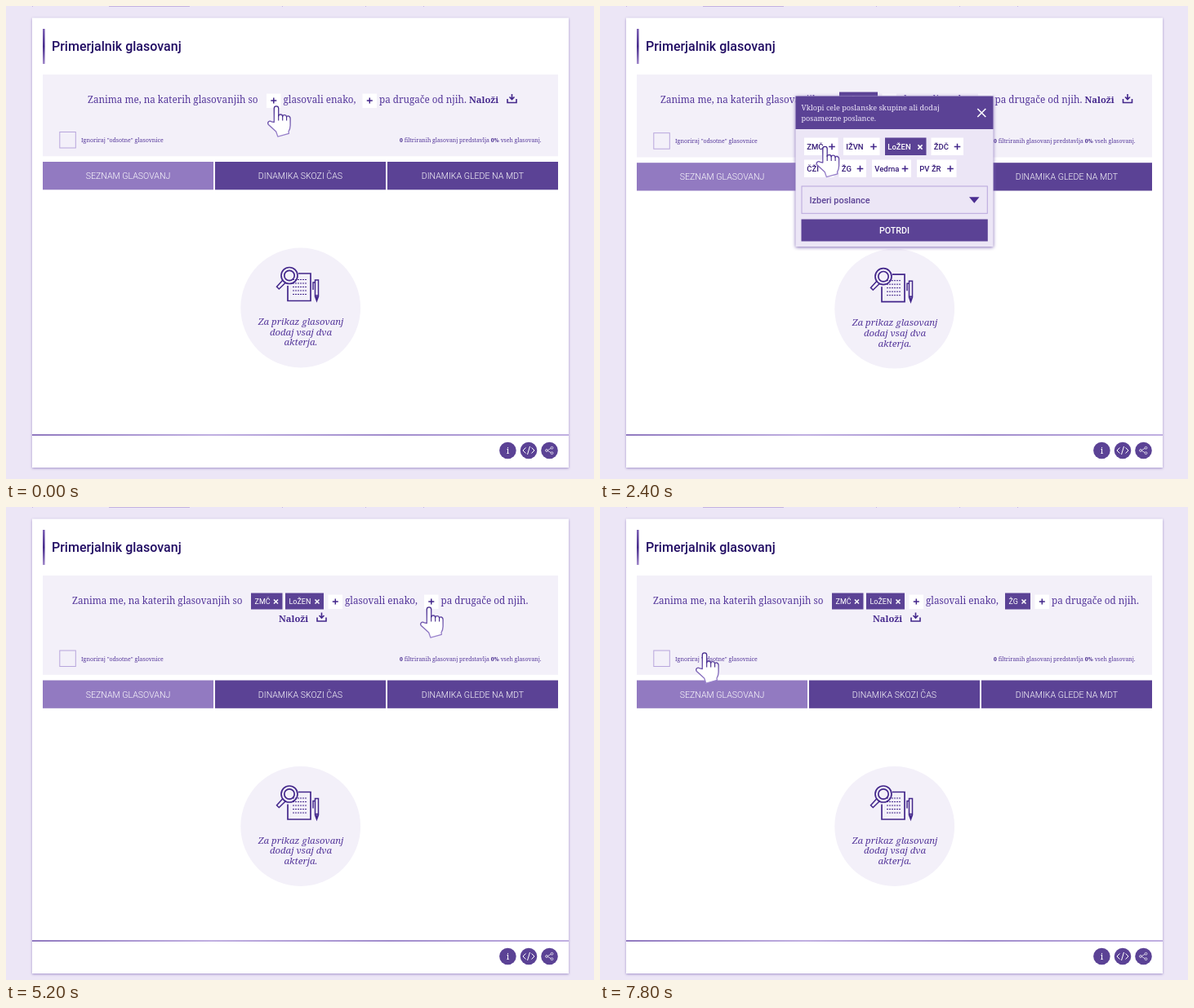
An HTML page for the animation above (8 s loop, 720 by 580 pixels).

```html
<!DOCTYPE html>
<html lang="sl">
<head>
<meta charset="utf-8">
<style>
  html, body { margin: 0; width: 100%; height: 100%; overflow: hidden; background: #ece6f6; }
  svg { display: block; width: 720px; height: 580px; }
  text { font-family: Roboto, sans-serif; white-space: pre; }
  .serif { font-family: "Noto Serif", serif; fill: #55379b; }
  .bold { font-weight: 700; fill: #44278c; }
  .mid { text-anchor: middle; }
  .line { fill: none; stroke: #43278b; }
  .white { fill: none; stroke: #fff; }
  .card { filter: drop-shadow(0 1px 1.5px #a08fc9); }
  .popup { filter: drop-shadow(0 1px 2px #8069b4); }
</style>
</head>
<body>
<svg id="stage" viewBox="0 0 720 580"></svg>
<script>
const LOOP = 8000, STEP = 200;
const PURPLE = '#5b4295', PALE = '#f3f0f9', LILAC = '#ece6f6';
const stage = document.getElementById('stage');

const rect = (x, y, w, h, fill, extra = '') =>
  `<rect x="${x}" y="${y}" width="${w}" height="${h}" fill="${fill}" ${extra}/>`;
const text = (x, y, size, content, extra = '') =>
  `<text x="${x}" y="${y}" font-size="${size}" ${extra}>${content}</text>`;
const path = (d, extra) => `<path d="${d}" ${extra}/>`;
const group = (x, y, content, extra = '') => `<g transform="translate(${x} ${y})" ${extra}>${content}</g>`;
const plus = (x, y, r) => path(`M${x - r} ${y}h${2 * r}M${x} ${y - r}v${2 * r}`, 'class="line" stroke-width="1.5"');
const cross = (x, y, r, width = 1.5) =>
  path(`M${x - r} ${y - r}l${2 * r} ${2 * r}m0 ${-2 * r}l${-2 * r} ${2 * r}`, `class="white" stroke-width="${width}"`);

const parties = [
  ['ZMČ', 250, 162, 41.5], ['IŽVN', 298, 162, 44.5], ['LoŽEN', 349, 162, 50.5], ['ŽDČ', 405.5, 162, 39.5],
  ['ČŽI', 250, 189, 36.5], ['ŽG', 292.5, 189, 33.5], ['Vedrna', 333, 189, 48], ['PV ŽR', 388, 189, 48.5]
];
const chipWidth = { 'ZMČ': 38.5, 'LoŽEN': 47, 'ŽG': 31 };

// Selections and the vertical shifts they cause in the layout.
const layouts = [
  { from: 0, x: 100, same: [], other: [], dy: 0, foot: 0 },
  { from: 1600, x: 74, same: ['LoŽEN'], other: [], dy: 1.2, foot: 0 },
  { from: 2600, x: 81, same: ['ZMČ', 'LoŽEN'], other: [], dy: 21.5, foot: 6, wrap: true },
  { from: 6600, x: 65, same: ['ZMČ', 'LoŽEN'], other: ['ŽG'], dy: 21.5, foot: 6, wrap: true }
];

// Pointer keys: time, x, y, opacity.
const pointerKeys = [
  [0, 320, 121.5, 1], [400, 320, 121.5, 1], [1400, 346.5, 172, 1], [1600, 346.5, 172, 1],
  [2400, 264.5, 171, 1], [2600, 264.5, 171, 1], [3200, 264.5, 171, 0], [3201, 346, 271, 0],
  [3400, 346, 271, 0], [4000, 346, 271, 1], [4400, 346, 271, 1], [5200, 507, 121.5, 1],
  [5400, 507, 121.5, 1], [6400, 293, 203.5, 1], [6600, 293, 203.5, 1], [7000, 346, 271, 1],
  [7200, 346, 271, 1], [7800, 117, 177.5, 1], [LOOP, 117, 177.5, 1]
];

function pointerAt(t) {
  const i = pointerKeys.findIndex(key => key[0] > t);
  const a = pointerKeys[i - 1], b = pointerKeys[i];
  const p = (t - a[0]) / (b[0] - a[0]), eased = p * p * (3 - 2 * p);
  return [1, 2, 3].map(k => a[k] + (b[k] - a[k]) * (k < 3 ? eased : p));
}

function picker(x, names) {
  let out = '';
  for (const name of names) {
    const w = chipWidth[name];
    out += rect(x, 105.5, w, 20, PURPLE) + text(x + 4.5, 119, 9, name, 'fill="#fff"') + cross(x + w - 8, 116, 2.5);
    x += w + 3.5;
  }
  if (names.length) x += 2;
  return [out + rect(x, 107.5, 17.5, 17.5, '#fff') + plus(x + 8.8, 116, 3.5), x + 20.5];
}

function sentence({ x, same, other, wrap }) {
  const phrase = (px, words) => text(px, 119, 11.7, words, 'class="serif"');
  const [first, enakoX] = picker(x + 219, same);
  const [second, paX] = picker(enakoX + 97, other);
  const loadX = wrap ? 334 : paX + 110, loadY = wrap ? 21.5 : 0;
  const load = text(0, 119, 11.2, 'Naloži', 'class="serif bold"') +
    path('M47 114v4.5h11v-4.5M52.5 108v6.5m-3-3l3 3l3-3', 'class="line" stroke-width="1.6"');
  return phrase(x, 'Zanima me, na katerih glasovanjih so') + first + phrase(enakoX, 'glasovali enako,') +
    second + phrase(paX, 'pa drugače od njih.') + group(loadX, loadY, load);
}

function emptyState() {
  const dashes = [335.5, 340, 344.5, 349, 353.5].map(y => `M351 ${y}h17`).join('');
  return '<circle cx="360.7" cy="370" r="73.4" fill="' + PALE + '"/>' +
    path('M345 343v18.5h28v-33.5h-15', 'class="line" stroke-width="1.7"') +
    path(dashes, 'class="line" stroke-width="1" stroke-dasharray="2 1"') +
    `<g class="line" stroke-width="1.7"><circle cx="347" cy="330.5" r="10"/><circle cx="347" cy="330.5" r="6.2"/></g>` +
    path('M339 336l-7.5 8.2l2.8 2.8l8-7.7', 'class="line" stroke-width="1.5"') +
    path('M378.5 336h4v20l-2 5.5l-2-5.5zM378.5 339h-2.5v9M378.5 355h4', 'class="line" stroke-width="1.5"') +
    path('M379 356h3l-1.5 5z', 'fill="#43278b"') +
    ['Za prikaz glasovanj', 'dodaj vsaj dva', 'akterja.'].map((words, i) =>
      text(361, 391 + 12.7 * i, 11.4, words, 'class="serif mid" font-style="italic"')).join('');
}

function footer() {
  const dots = [614.4, 640, 665.5].map(x => `<circle cx="${x}" cy="545" r="10.3" fill="${PURPLE}"/>`).join('');
  return rect(32, 525.2, 657, 1.6, 'url(#rule)') + dots +
    text(614.4, 549, 11, 'i', 'class="mid" style="font-family:\'Noto Serif\',serif" fill="#fff"') +
    path('M636.5 541.5l-3.5 3.5l3.5 3.5m7-7l3.5 3.5l-3.5 3.5m-2-8.5l-3 10', 'class="white" stroke-width="1"') +
    path('M668 542l-5.5 3l5.5 3', 'class="white" stroke-width=".7"') +
    [[662, 545], [668.5, 541.8], [668.5, 548.2]].map(([x, y]) =>
      `<circle cx="${x}" cy="${y}" r="1.4" fill="${PURPLE}" stroke="#fff" stroke-width=".7"/>`).join('');
}

function page(layout) {
  const { dy, foot } = layout;
  const tabs = ['SEZNAM GLASOVANJ', 'DINAMIKA SKOZI ČAS', 'DINAMIKA GLEDE NA MDT'].map((label, i) =>
    rect(45 + 211 * i, 191, 209, 34.3, i ? PURPLE : '#927ac1') +
    text(149.5 + 211 * i, 212, 10.6, label, 'class="mid" fill="#fff" font-weight="300"')).join('');
  const options = rect(65.8, 154.5, 19.5, 19.5, 'none', 'stroke="#b8a6dc"') +
    text(92, 167, 7.05, 'Ignoriraj "odsotne" glasovnice', 'class="serif"') +
    text(655.5, 167, 6.9, '<tspan class="bold">0</tspan> filtriranih glasovanj predstavlja ' +
      '<tspan class="bold">0%</tspan> vseh glasovanj.', 'class="serif" text-anchor="end"');
  return rect(0, 0, 720, 580, LILAC) +
    path('M126 .3h99', 'stroke="#b9a5dd"') + path('M32 .3h1m305 0h1m101 0h1m70 0h1', 'stroke="#b9a5dd"') +
    rect(32, 14.5, 657, 551.5 + foot, '#fff', 'class="card"') +
    rect(45, 28, 2.6, 43, 'url(#accent)') +
    text(56, 55, 16, 'Primerjalnik glasovanj', 'font-weight="500" fill="#210c63"') +
    rect(45, 84, 631, 100.3 + dy, PALE) + sentence(layout) +
    group(0, dy, options + tabs + emptyState()) + group(0, foot, footer());
}

function popup(selected) {
  const buttons = parties.map(([name, x, y, w]) => {
    const on = selected.includes(name), markX = x + w - 7.5;
    return rect(x, y - .5, w, 21.5, on ? PURPLE : '#fff') +
      text(x + 3.3, y + 14, 9.5, name, `font-weight="500" fill="${on ? '#fff' : '#351a78'}"`) +
      (on ? cross(markX, y + 11, 2.6) : plus(markX, y + 10.5, 3.8));
  }).join('');
  const intro = ['Vklopi cele poslanske skupine ali dodaj', 'posamezne poslance.'].map((words, i) =>
    text(246.5, 128 + 13 * i, 9.1, words, 'class="serif" style="fill:#eee7fa"')).join('');
  return `<g class="popup">${rect(239.5, 110.5, 242, 184.5, LILAC)}</g>` +
    rect(239.5, 110.5, 242, 40.5, PURPLE) + intro + cross(467.3, 131, 5, 1.6) + buttons +
    rect(247, 221, 227.3, 33.3, 'none', 'stroke="#b8a6dc"') +
    text(256.5, 241.5, 10.9, 'Izberi poslance', `fill="${PURPLE}" font-weight="500"`) +
    path('M452 234.3h12.5l-6.2 7.5z', 'fill="#4b2e91"') +
    rect(246.5, 261.5, 228.3, 27, PURPLE) +
    text(360.5, 278.5, 10.7, 'POTRDI', 'class="mid" fill="#fff" font-weight="500"');
}

const hand = path('M8.3 21V4a2.7 2.7 0 0 1 5.4 0V13.5q.3-2 2.5-2t2.5 2.3q.4-1.8 2.5-1.6t2.4 2.4' +
  'q.4-1.4 2.2-1.1q2.2.4 2.3 3V25q0 4-2.1 7.5l.4 2.3l-13.5 3.9l-2.2-6.2L1.4 24q-1.6-2 .2-3.8q1.5-1.2 3.6.2z',
  'fill="#fff" stroke="url(#ink)" stroke-width="1.3" stroke-linejoin="round"') +
  path('M13.7 12v7m5-6v6m4.9-5v5', 'class="line" stroke-width="1.1"');

const gradient = (id, direction, stops) => `<linearGradient id="${id}" ${direction}>` +
  stops.map((c, i) => `<stop offset="${i / (stops.length - 1)}" stop-color="${c}"/>`).join('') + '</linearGradient>';
const defs = '<defs>' +
  gradient('accent', 'x2="0" y2="1"', ['#7d61b5', '#472b8c', '#a28acb']) +
  gradient('rule', 'x2="1"', ['#7659b0', '#b19cda', '#8a70c0', '#b19cda']) +
  gradient('ink', 'x2="0" y2="1"', ['#3e2388', '#9e87cf']) + '</defs>';

function render(t) {
  const layout = layouts.filter(l => l.from <= t).pop();
  const firstPopup = t >= 400 && t < 4400, secondPopup = t >= 5400 && t < 7200;
  const [x, y, opacity] = pointerAt(t);
  stage.innerHTML = defs + page(layout) +
    (firstPopup ? popup(layout.same) : secondPopup ? popup(layout.other) : '') +
    group(x, y, hand, `opacity="${opacity}"`);
}

const start = performance.now();
let shown = -1;
function tick() {
  const t = Math.floor((performance.now() - start) % LOOP / STEP) * STEP;
  if (t !== shown) render(shown = t);
  requestAnimationFrame(tick);
}
tick();
</script>
</body>
</html>
```
